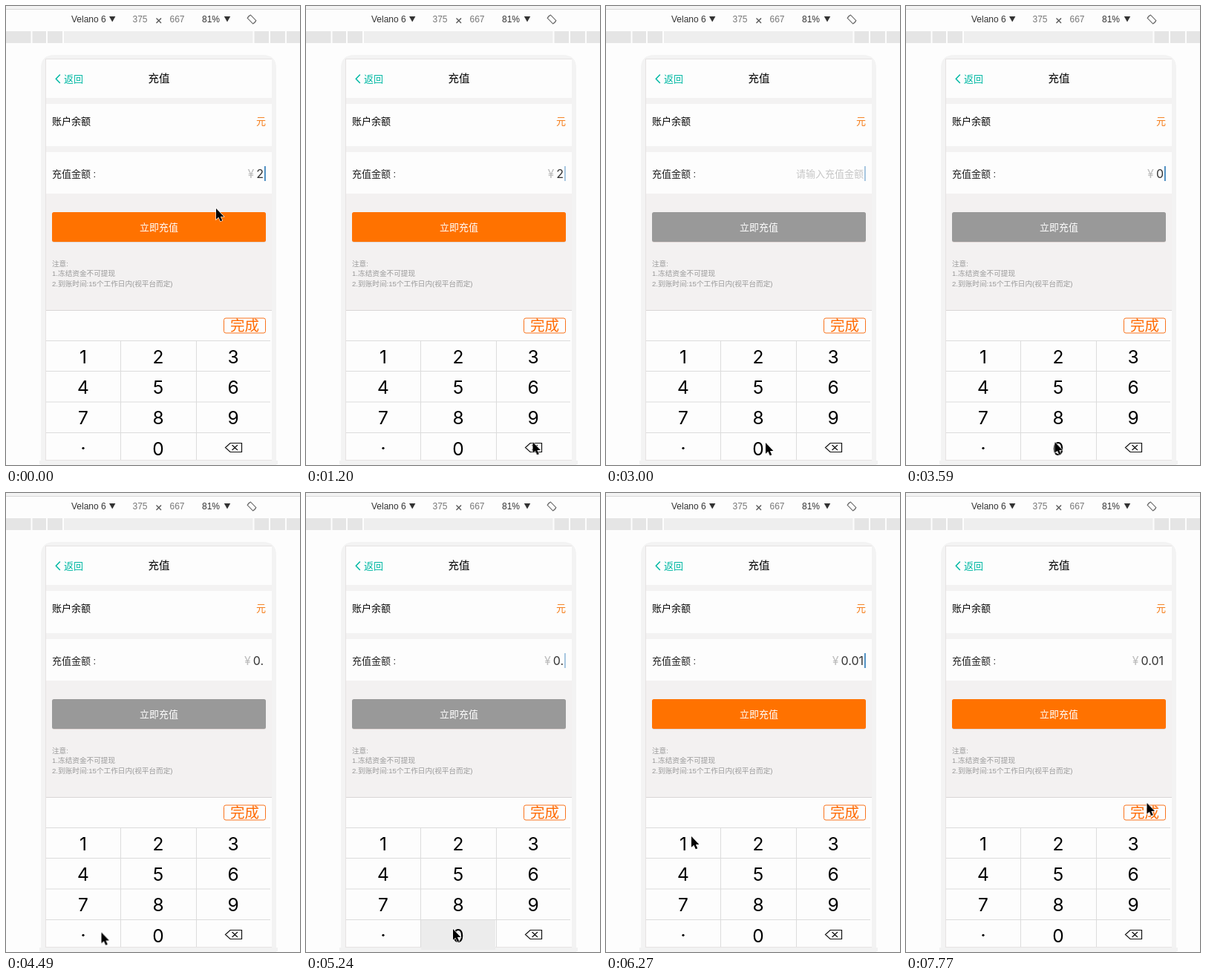
Recreate the animation shown at these times as an HTML page. Size 396 by 619 pixels, loop 8000 ms.

```html
<!DOCTYPE html>
<html lang="zh-CN">
<head>
<meta charset="utf-8">
<title>充值</title>
<style>
  html, body { margin: 0; width: 100%; height: 100%; overflow: hidden; background: #fdfdfd; }
  #stage { display: block; width: 396px; height: 619px; }
  text { font-family: "Liberation Sans", "Noto Sans CJK SC", "Noto Sans CJK", sans-serif; font-size: 13px; }
  .bar text { font-size: 12px; }
  .mid { text-anchor: middle; }
  .end { text-anchor: end; }
  .notes text { font-size: 9.65px; fill: #999; }
  .keys text { font: 24.5px Inter, "Liberation Sans", sans-serif; text-anchor: middle; }
  .sum { font: 16px Inter, "Liberation Sans", sans-serif; fill: #333; text-anchor: end; }
  .sum tspan:first-child { fill: #bdbdbd; }

  /* every change is a hard step in one 8 s loop */
  #reel, #caret, #pay, #press, #mouse { animation: 8s step-end infinite; }
  #reel { animation-name: reel; }
  #caret { animation-name: blink; }
  #pay { animation-name: pay; }
  #press { animation-name: press; }
  #mouse { animation-name: mouse; }

  @keyframes reel {
    0% { transform: translateY(0); }
    22.5% { transform: translateY(-40px); }
    44.875% { transform: translateY(-80px); }
    56.125% { transform: translateY(-120px); }
    67.375% { transform: translateY(-160px); }
    78.375%, 100% { transform: translateY(-200px); }
  }
  @keyframes blink {
    0%, 16.875%, 31.875%, 44.875%, 59.875%, 74.75%, 89.625% { opacity: 1; }
    3.75%, 15%, 22.5%, 30%, 37.5%, 43%, 50.5%, 58%, 65.5%, 73%, 82.125%, 87.75%, 95.25% { opacity: .5; }
    5.625%, 24.375%, 39.375%, 52.375%, 67.375%, 84%, 97.125%, 100% { opacity: 0; }
  }
  @keyframes pay {
    0%, 78.375%, 100% { fill: #ff7200; }
    22.5% { fill: #999; }
  }
  @keyframes press {
    0%, 44.875%, 56.125%, 67.375%, 78.375%, 100% { opacity: 0; transform: none; }
    43%, 65.5% { opacity: 1; transform: translate(101px, 124px); }
    54.25% { opacity: 1; transform: translate(0, 124px); }
    76.5% { opacity: 1; transform: none; }
  }
  @keyframes mouse {
    0% { transform: translate(283px, 273px); }
    3.75% { transform: translate(318px, 305px); }
    5.625% { transform: translate(360px, 425px); }
    7.5% { transform: translate(335px, 540px); }
    9.375% { transform: translate(305.5px, 588px); }
    30% { transform: translate(304px, 588px); }
    31.875% { transform: translate(290px, 588px); }
    33.75% { transform: translate(262px, 589px); }
    35.625% { transform: translate(235px, 589px); }
    37.5% { transform: translate(215px, 589px); }
    39.375% { transform: translate(205px, 589px); }
    43% { transform: translate(200.5px, 588px); }
    46.75% { transform: translate(196px, 590px); }
    48.625% { transform: translate(172px, 596px); }
    50.5% { transform: translate(146px, 598px); }
    52.375% { transform: translate(131px, 594px); }
    54.25% { transform: translate(128.5px, 592.5px); }
    58% { transform: translate(150px, 594px); }
    59.875% { transform: translate(182px, 592px); }
    61.75% { transform: translate(198px, 588px); }
    69.25% { transform: translate(190px, 560px); }
    71.125% { transform: translate(150px, 500px); }
    73% { transform: translate(120px, 467px); }
    74.75% { transform: translate(115px, 463px); }
    82.125% { transform: translate(116px, 463px); }
    84% { transform: translate(140px, 464px); }
    85.875% { transform: translate(190px, 458px); }
    87.75% { transform: translate(245px, 446px); }
    89.625% { transform: translate(290px, 432px); }
    91.5% { transform: translate(315px, 422px); }
    93.375% { transform: translate(323px, 419px); }
    95.25%, 100% { transform: translate(324.5px, 418px); }
  }
</style>
</head>
<body>
<svg id="stage" viewBox="0 0 396 619">
  <rect width="396" height="619" fill="#fdfdfd"/>

  <!-- toolbar and ruler -->
  <path d="M0 0H396V4H0Z" fill="#f3f3f3"/>
  <path d="M0 4.5H396" stroke="#d8d8d8"/>
  <g class="bar" fill="#333">
    <text x="88" y="22">Velano 6</text>
    <path d="M139 14h8.4l-4.2 7.5ZM293.800 14h8.4l-4.200 7.500Z"/>
    <text x="264" y="22">81%</text>
    <text x="170.500" y="22" fill="#777">375</text>
    <text x="220.500" y="22" fill="#777">667</text>
  </g>
  <path d="M202.500 16.500l6.500 6.500m0-6.500l-6.500 6.500" stroke="#555" stroke-width="1.300"/>
  <g fill="none" stroke="#666">
    <rect x="328" y="12.500" width="6" height="11" rx="1" transform="rotate(-45 331 18)"/>
    <path d="M325 17a6.200 6.200 0 0 1 5-5M337 19a6.200 6.200 0 0 1-5 5"/>
  </g>
  <path d="M0 34H396V50H0Z" fill="#e5e5e5"/>
  <path d="M77 34H333V50H77Z" fill="#eee"/>
  <path d="M34.500 34v16M55 34v16M77 34v16M333.500 34v16M355 34v16M377 34v16" stroke="#fdfdfd" stroke-width="2"/>

  <!-- device and page -->
  <path d="M47 619V84Q47 66 65 66H346Q364 66 364 84V619Z" fill="#f3f3f3"/>
  <path d="M45 613H366V618H45Z" fill="#f2f2f2"/>
  <path d="M53 71H358V613H53Z" fill="#e6e3e3"/>
  <path d="M54 72H358V612H54Z" fill="#f3f2f2"/>
  <path d="M54 72H358V124H54ZM54 132H358V189H54ZM54 197H358V253H54ZM54 411H358V612H54Z" fill="#fdfdfd"/>
  <path d="M54 253H358V410H54Z" fill="#f3f1f1"/>

  <path d="M72.800 92.500L67.300 98.300l5.500 5.800" fill="none" stroke="#00b8a4" stroke-width="1.500"/>
  <text x="78" y="103" fill="#00b8a4">返回</text>
  <text x="206" y="103.300" class="mid" style="font-size:14.500px">充值</text>
  <text x="62" y="159.500">账户余额</text>
  <text x="350" y="159.500" class="end" fill="#f57a14">元</text>
  <text x="62" y="231" fill="#222">充值金额 :</text>

  <svg x="240" y="212" width="108" height="30">
    <g id="reel">
      <text class="sum" x="107" y="20"><tspan>¥</tspan><tspan dx="3">2</tspan></text>
      <text class="end" x="107" y="59" fill="#c6c6c6">请输入充值金额</text>
      <text class="sum" x="107" y="100"><tspan>¥</tspan><tspan dx="3">0</tspan></text>
      <text class="sum" x="107" y="140"><tspan>¥</tspan><tspan dx="3">0.</tspan></text>
      <text class="sum" x="107" y="180"><tspan>¥</tspan><tspan dx="3">0.0</tspan></text>
      <text class="sum" x="107" y="220"><tspan>¥</tspan><tspan dx="3">0.01</tspan></text>
    </g>
  </svg>
  <rect id="caret" x="348" y="216" width="1.800" height="20" fill="#3f86bd"/>

  <rect x="62" y="279" width="288" height="40" rx="3" fill="#e2d8d6"/>
  <rect id="pay" x="62" y="278" width="288" height="40" rx="2.500" fill="#ff7200"/>
  <text x="206" y="303" class="mid" fill="#fff" font-weight="500">立即充值</text>

  <g class="notes">
    <text x="62" y="350.500" font-weight="500">注意:</text>
    <text x="62" y="364.300">1.冻结资金不可提现</text>
    <text x="62" y="378">2.到账时间:15个工作日内(视平台而定)</text>
  </g>

  <!-- keypad -->
  <path d="M54 410.500H358" stroke="#d9d6d6"/>
  <rect x="293.500" y="421" width="56" height="20" rx="2.500" fill="none" stroke="#f9731c"/>
  <text x="321.500" y="438.200" class="mid" fill="#ff6a00" style="font-size:19.500px">完成</text>
  <rect id="press" x="54" y="452" width="100" height="40" fill="#ececec"/>
  <path d="M54 451.500H356M54 492.500H356M54 534H356M54 575.500H356M154.500 451V612M256.500 451V612" stroke="#dcdcdc"/>
  <g class="keys">
    <text x="104 205 306" y="481.500">123</text>
    <text x="104 205 306" y="523">456</text>
    <text x="104 205 306" y="564">789</text>
    <text x="205" y="605.500">0</text>
    <circle cx="104" cy="596.300" r="1.600"/>
  </g>
  <path d="M295.500 595.500L302 589.500H317.500V601.500H302ZM304.500 592l7.500 7m0-7l-7.500 7" fill="none" stroke="#111" stroke-width="1.200"/>

  <path id="mouse" d="M0 0V14.800L3.300 11.800 5.800 17.300 8.300 16.200 5.900 10.900H10.400Z" fill="#000" stroke="#fff" stroke-width="1.200" paint-order="stroke"/>
</svg>
</body>
</html>
```
